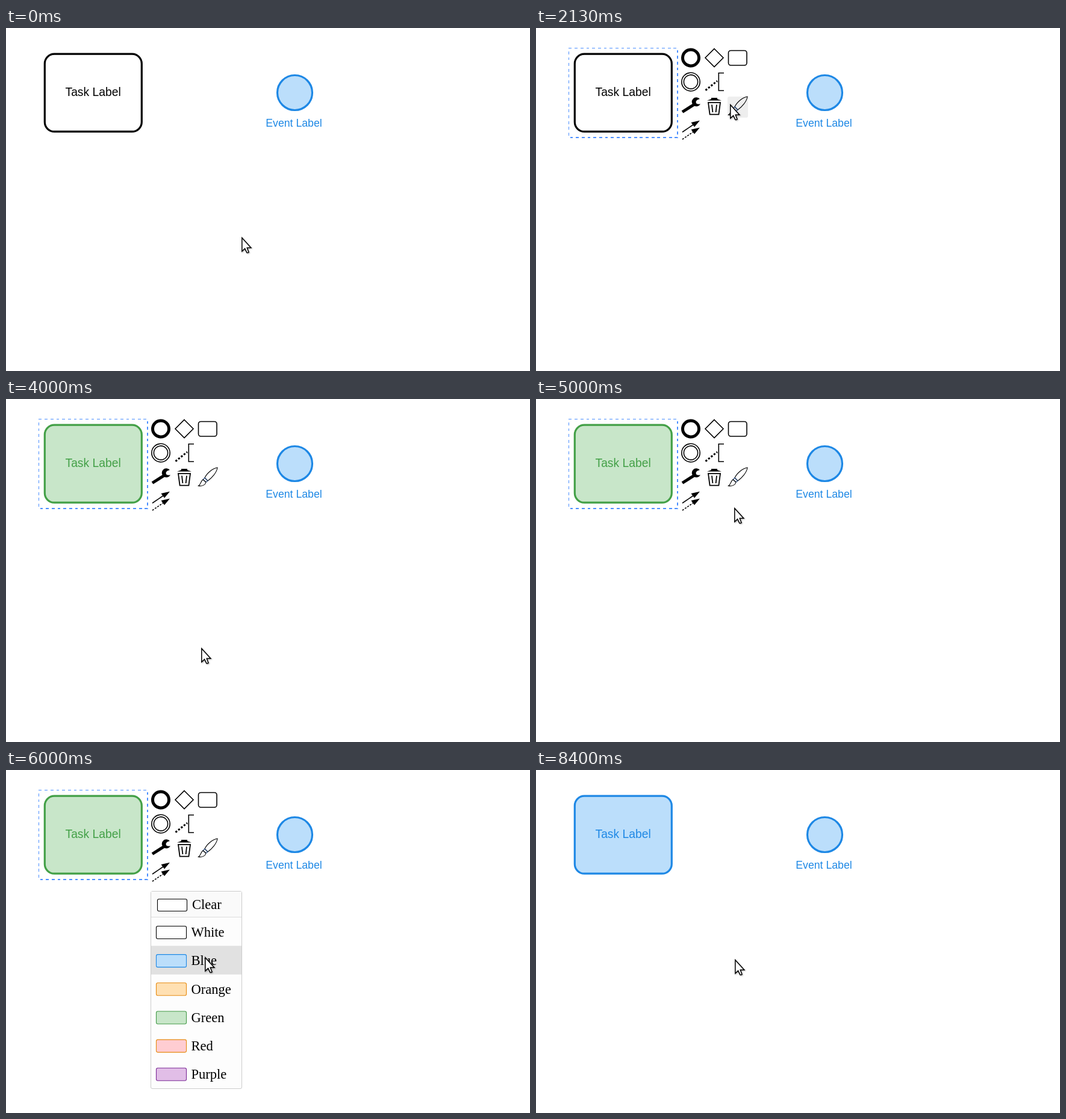
These frames come from a looping animation (870x570 px, 9.99 s). An HTML page:

```html
<!DOCTYPE html>
<html lang="en">
<head>
<meta charset="utf-8">
<title>Element colors</title>
<style>
  html, body { margin: 0; width: 100%; height: 100%; overflow: hidden; background: #fff; }
  svg { display: block; }
  text { font-family: "Liberation Sans", Arial, sans-serif; text-anchor: middle; }
  #menu text { font: 22.5px "Liberation Serif", "Times New Roman", serif; text-anchor: start; }
  #icons { fill: none; stroke: #000; stroke-width: 1.6; }
  #icons .solid { fill: #000; stroke: none; }
  #cursor { filter: drop-shadow(1px 1px 1px #0005); }
</style>
</head>
<body>
<svg width="870" height="570" viewBox="0 0 870 570">
  <g id="task" stroke-width="3.2">
    <rect x="64.3" y="43.2" width="161" height="129" rx="16"/>
    <text id="label" x="144.6" y="113" font-size="19.3" stroke="none">Task Label</text>
  </g>
  <rect id="outline" x="54.6" y="33.5" width="180.4" height="148.3" fill="none"
        stroke-width="1.6" stroke-dasharray="4.83" shape-rendering="crispEdges"/>

  <circle cx="479.5" cy="107.5" r="29" fill="#bbdefb" stroke="#1e88e5" stroke-width="3.2"/>
  <text x="478" y="164" font-size="17.7" fill="#1e88e5">Event Label</text>

  <g id="pad">
    <rect id="cell" width="34" height="35" rx="3" fill="#eee"/>
    <g id="icons">
      <circle cx="257" cy="49.5" r="13.5" stroke-width="5"/>
      <path d="M296 34.5l15 15-15 15-15-15z"/>
      <rect x="319.5" y="37.5" width="30.5" height="24.5" rx="4"/>
      <circle cx="257" cy="89.5" r="15.2"/>
      <circle cx="257" cy="89.5" r="11.6"/>
      <path d="M312 74.8H303.3V104H312"/>
      <path d="M281.5 103.5L301 88" stroke-width="3" stroke-dasharray="3.2 2.6"/>
      <path d="M243 139.5L262 127.5" stroke-width="5"/>
      <path class="solid" d="M272 118A7.5 7.5 0 1 0 273 126Q266 128 265.5 123Q266 119 272 118z"/>
      <path class="solid" d="M284 120.5L291 118V116H301V118L308 120.5z"/>
      <path d="M286 123.8L288.6 143.6H303.4L306 123.8zM292 127.5l1.4 12.5M300 127.5l-1.4 12.5" stroke-width="1.8"/>
      <g stroke-width="1.1">
        <path d="M351 114C343 115 333 124 330 131L335 136C342 131 350 122 351 114z"/>
        <path d="M330 131l-3 3 5 4 3-2z" stroke="#247"/>
        <path d="M327 134C323 137 324 141 319.5 144.5C326 145 331 143 332 138z"/>
      </g>
      <path d="M243 173L262 160"/>
      <path d="M243 185L262 172" stroke-dasharray="3 2"/>
      <path class="solid" d="M272 153.8l-14.5 3.2 5.5 7.5zM272 165.6l-14.5 3.2 5.5 7.5z"/>
    </g>
  </g>

  <g id="menu">
    <rect x="240.5" y="201.5" width="151" height="328" rx="2.5" fill="#fdfdfd" stroke="#ccc"/>
    <path d="M241 202H391V244H241z" fill="#fafafa"/>
    <path d="M241 244.5H391" stroke="#ddd"/>
    <rect id="row" fill="#e1e1e1"/>
  </g>

  <path id="cursor" d="M.8.8V23L5.6 18.6 8.8 25.2Q10.5 26 12 24.6L9.2 17.2H15.8z"
        fill="#fff" stroke="#000" stroke-width="1.5"/>
</svg>
<script>
const $ = id => document.getElementById(id);
const set = (el, attrs) => { for (const k in attrs) el.setAttribute(k, attrs[k]); };
const show = (id, on) => set($(id), { visibility: on ? 'visible' : 'hidden' });

const ROW = 47.15;
const add = (tag, attrs, text = '') => {
  const el = document.createElementNS('http://www.w3.org/2000/svg', tag);
  set(el, attrs);
  el.textContent = text;
  $('menu').append(el);
};
const entry = (name, fill, stroke, x, y, width, height, textX, textY) => {
  add('rect', { x, y, width, height, rx: 2.5, fill, stroke, 'stroke-width': 1.1 });
  add('text', { x: textX, y: textY }, name);
};
entry('Clear', '#fff', '#000', 251.5, 214.5, 49, 20, 309, 231);
[
  ['White', '#fff', '#000'],
  ['Blue', '#bbdefb', '#1e88e5'],
  ['Orange', '#ffe0b2', '#e68a10'],
  ['Green', '#c8e6c9', '#439a47'],
  ['Red', '#ffcdd2', '#e68a10'],
  ['Purple', '#e1bee7', '#7b2a96']
].forEach(([name, fill, stroke], i) =>
  entry(name, fill, stroke, 249.5, 259.5 + i * ROW, 50, 21, 307.6, 277.2 + i * ROW));

// Pointer path: tick, x, y, eased
const path = [
  [0, 391, 348], [6, 391, 348], [15, 192, 138, 1], [20, 192, 138], [32, 322, 127, 1],
  [37, 322, 127], [42, 324, 296], [43, 324, 313], [47, 324, 413], [48, 324, 414],
  [60, 324, 414], [62, 324, 410], [67, 324, 410], [78, 330, 130, 1], [80, 330, 130],
  [83, 335, 228], [84, 335, 259], [89, 330, 309], [90, 330, 311], [107, 330, 311],
  [108, 330, 315], [150, 330, 315]
];
function pointer(n) {
  const i = Math.max(1, path.findIndex(p => p[0] >= n));
  const [n0, x0, y0] = path[i - 1], [n1, x1, y1, eased] = path[i];
  let k = (n - n0) / (n1 - n0);
  if (eased) k = k * k * (3 - 2 * k);
  return [Math.round(x0 + (x1 - x0) * k), Math.round(y0 + (y1 - y0) * k)];
}

const inside = (x, y, l, t, r, b) => x >= l && x <= r && y >= t && y <= b;
const columns = [4, 3, 3, 1];  // the top row has its third cell, see below
columns[0] = 3; columns[1] = 2;

function draw(now) {
  const n = Math.min(149, Math.floor((now % 9990 + 5) * 0.015));
  const [x, y] = pointer(n);
  const [hx, hy] = pointer(Math.max(0, n - 1));  // hover follows one tick late
  set($('cursor'), { transform: `translate(${x} ${y})` });

  const [fill, stroke] = n < 60 ? ['#fff', '#000'] : n < 104 ? ['#c8e6c9', '#43a047'] : ['#bbdefb', '#1e88e5'];
  set($('task'), { fill, stroke });
  set($('label'), { fill: stroke });

  const padOn = n >= 18 && n < 126;
  const menuOn = n >= 38 && n < 60 || n >= 81 && n < 104;
  const over = inside(hx, hy, 64, 43, 226, 173);
  show('outline', over || padOn);
  set($('outline'), { stroke: over ? '#f88' : '#4d90ff' });

  const col = Math.floor((hx - 240) / 39), line = Math.floor((hy - 33) / 40.3);
  show('pad', padOn);
  show('cell', padOn && col >= 0 && col < columns[line]);
  set($('cell'), { x: 240 + col * 39, y: Math.round(33 + line * 40.3) });

  const onClear = inside(hx, hy, 249, 205, 360, 242);
  const i = Math.floor((hy - 245) / ROW);
  show('menu', menuOn);
  show('row', menuOn && (onClear || i >= 0 && i < 6));
  set($('row'), onClear
    ? { x: 249, y: 205, width: 111, height: 37, rx: 4 }
    : { x: 241, y: 245 + i * ROW, width: 150, height: ROW + 0.5, rx: 0 });
}

let start;
function loop(now) {
  start ??= now;
  draw(now - start);
  requestAnimationFrame(loop);
}
draw(0);
requestAnimationFrame(loop);
</script>
</body>
</html>
```
